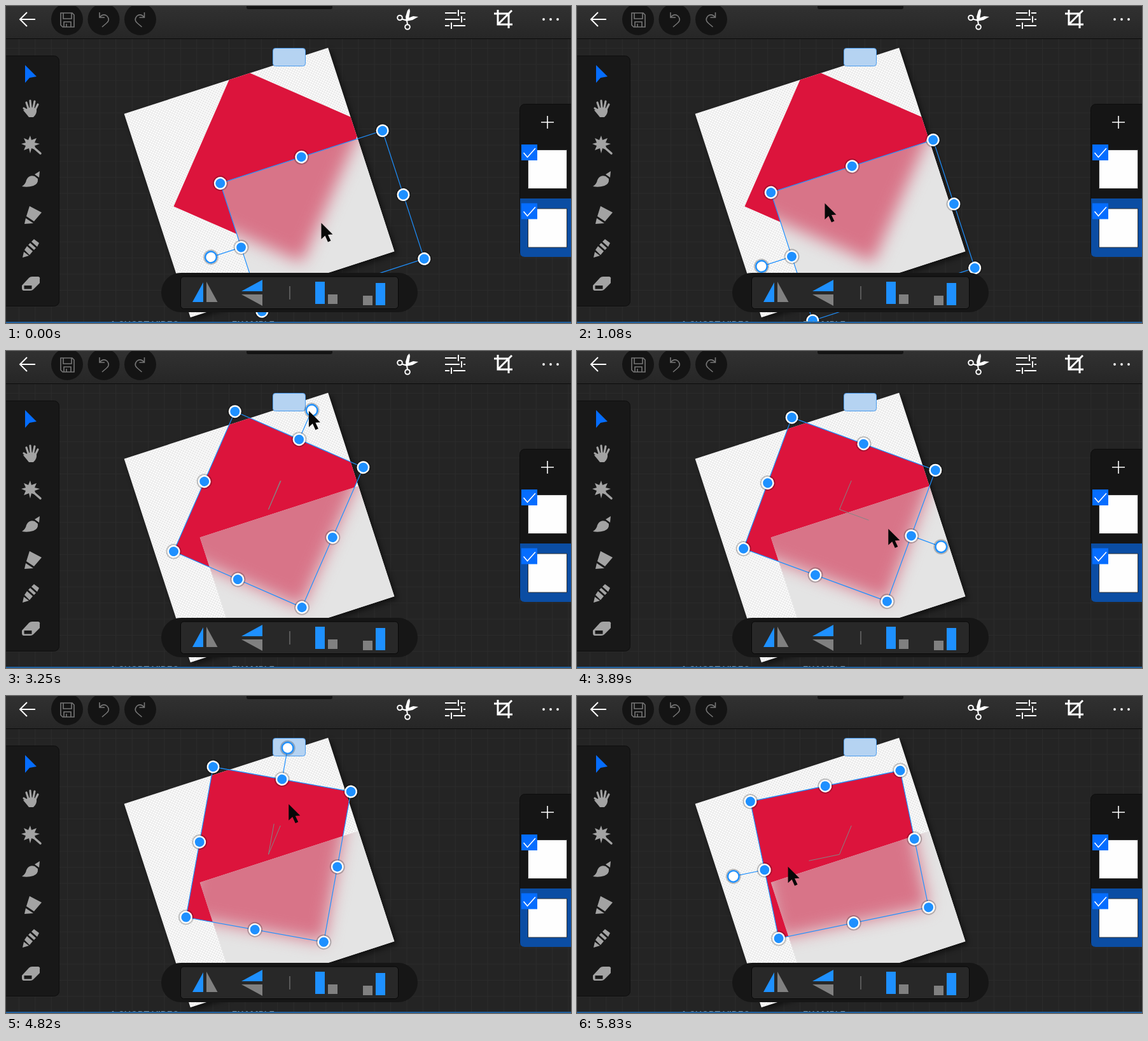
Recreate the animation shown at these times as an HTML page. Size 888 by 499 pixels, loop 5.91 s.

```html
<!DOCTYPE html>
<html lang="en">
<head>
<meta charset="utf-8">
<title>Image editor: move and rotate layers</title>
<style>
  html, body { margin: 0; width: 100%; height: 100%; overflow: hidden; background: #242424; }
  svg { display: block; }
  .line { fill: none; stroke: #fff; stroke-width: 2; }
  .thin { stroke-width: 1.6; }
  .dim { stroke: #767676; }
  .tool { fill: #a3a3a3; stroke: none; }
  .edge { fill: none; stroke: #1e90ff; stroke-width: 1.2; }
  .blue { fill: #1e90ff; }
  .grey { fill: #808080; }
</style>
</head>
<body>
<svg width="888" height="499" viewBox="0 0 888 499">
  <defs>
    <pattern id="grid" width="25.4" height="25.4" x="96" y="66" patternUnits="userSpaceOnUse">
      <path d="M0 .5H26M.5 0V26" stroke="#2b2b2b" fill="none"/>
    </pattern>
    <pattern id="checker" width="5" height="5" patternUnits="userSpaceOnUse">
      <path d="M0 0h5v5h-5z" fill="#fff"/>
      <path d="M0 0h2.500v2.500h-2.500zM2.500 2.500h2.500v2.500h-2.500z" fill="#e6e6e6"/>
    </pattern>
    <linearGradient id="bar" x2="0" y2="1">
      <stop stop-color="#313131"/><stop offset="1" stop-color="#262626"/>
    </linearGradient>
    <filter id="soft" filterUnits="userSpaceOnUse" x="0" y="0" width="888" height="600" color-interpolation-filters="sRGB">
      <feGaussianBlur stdDeviation="13"/>
    </filter>
    <filter id="shade"><feGaussianBlur stdDeviation="4"/></filter>
    <rect id="sheet" x="-168.5" y="-168.5" width="337" height="337" transform="translate(398 278) rotate(-18)"/>
    <clipPath id="page"><use href="#sheet"/></clipPath>
    <clipPath id="glass"><rect id="glassRect" x="-134" y="-106" width="268" height="212"/></clipPath>
    <rect id="card" x="-120.250" y="-110" width="240.500" height="220"/>
    <g id="handle"><circle r="12" fill="#000" opacity=".22"/><circle r="10" fill="#fff"/><circle r="7.5" class="blue"/></g>
    <g id="knob"><circle r="12" fill="#000" opacity=".22"/><circle r="10" class="blue"/><circle r="7.6" fill="#fff"/></g>
    <g id="layer">
      <path d="M820.500 226.500h61v61h-61z" fill="#fefefe" stroke="#333"/>
      <path d="M810 218h25v25h-25z" fill="#056dff"/>
      <path class="line thin" d="M813.500 231l6 7 12.500-14"/>
    </g>
  </defs>

  <rect width="888" height="499" fill="#242424"/>
  <rect width="888" height="499" fill="url(#grid)"/>

  <use href="#sheet" x="4" y="4" opacity=".55" filter="url(#shade)"/>
  <use href="#sheet" fill="url(#checker)"/>
  <g clip-path="url(#page)">
    <use class="card" href="#card" fill="#dc143c"/>
    <g clip-path="url(#glass)">
      <rect width="888" height="499" fill="#e4e4e4"/>
      <g filter="url(#soft)"><use class="card" href="#card" fill="#d87488"/></g>
    </g>
  </g>
  <rect x="419.500" y="66.500" width="51" height="28" rx="4" fill="#b5d3f2" stroke="#4a9aec"/>
  <path id="angle" fill="none" stroke="#858585"/>
  <g id="glassFrame"></g>
  <g id="cardFrame"></g>

  <!-- top bar -->
  <rect width="888" height="52" fill="url(#bar)"/>
  <path d="M0 51.500H888" stroke="#0c0c0c"/>
  <path d="M378 0h135v2q0 3-3 3h-129q-3 0-3-3z" fill="#131313"/>
  <g fill="#141414"><circle cx="96" cy="21" r="25"/><circle cx="153.500" cy="21" r="25"/><circle cx="211" cy="21" r="25"/></g>
  <path class="line" d="M46 21H22M33 10L22 21l11 11"/>
  <path class="line thin dim" d="M86 11h18l3 3v19H89l-3-3zM90 11v9h13v-9M91 33v-8h11v8M95 28v5"/>
  <g id="undo" class="line thin dim"><path d="M147 10v8h8M147 18q6-7 12-2 5 6-1 11l-7 6"/></g>
  <use href="#undo" transform="matrix(-1 0 0 1 364.500 0)"/>
  <g class="line"><circle cx="619" cy="18.500" r="3.800"/><circle cx="631" cy="33" r="3.800"/>
    <path d="M622 20.500l7 2M631 29l-1-6" /></g>
  <path fill="#fff" d="M627 21l13-5 8 1-9 5-10 2zM629 24l-1-7 3-10 3-3 1 4-2 12z"/>
  <path class="line" d="M690 11h18M714 11h8M711 6v10M690 21h23M719 21h3M716 16v10M690 31h7M703 31h19M700 26v10"/>
  <path class="line" style="stroke-width:3" d="M773 6v23h23M767 12h23v23M774 28L795 7"/>
  <g fill="#fff"><circle cx="845" cy="21" r="1.900"/><circle cx="856" cy="21" r="1.900"/><circle cx="867" cy="21" r="1.900"/></g>

  <!-- tools -->
  <rect x="-10" y="78.500" width="93.500" height="394" rx="8" fill="#181818" stroke="#0e0e0e"/>
  <path d="M30 93L48 111 37 113 30 121z" fill="#056dff"/>
  <g class="tool">
    <path d="M32 162q8-5 16 0 1 8-5 13h-7q-4-5-9-11z"/>
    <path d="M34 165l-6-4M35 161l-3-9M39 160l-1-11M43 160l2-10M46 163l4-8" stroke="#a3a3a3" stroke-width="3.200" stroke-linecap="round"/>
    <path d="M38 204l2 7 8-3-3 7 8 2-8 3 3 7-8-3-2 8-2-8-8 3 3-7-7-3 7-2-3-7 7 3z"/>
    <path d="M46 225l8 7" stroke="#a3a3a3" stroke-width="3.500" stroke-linecap="round"/>
    <path d="M25 284q6-4 7-10 4-9 13-6l5 4q1 8-7 11-9 3-18 1zM45 265l8-5-1 10z"/>
    <path d="M29 343l2-9 12 8zM32 331l5-16 19 10-12 14z"/>
    <path d="M26 396l2-9 8 6zM29 384l4-6 9 8-5 6zM35 376l3-3 9 8-3 3zM40 371l4-4 8 6-3 6z"/>
    <path d="M25 440l11-12q2-2 5-2h10q3 1 2 4v6l-10 10q-2 2-5 2H28q-3 0-3-4z"/>
  </g>
  <path d="M28.500 440h12v5.500h-12z" fill="#181818"/>

  <!-- layers -->
  <rect x="807.500" y="154.500" width="100" height="240" rx="8" fill="#151515" stroke="#0d0d0d"/>
  <path d="M808 303h80v92h-73q-7 0-7-7z" fill="#0b4da3"/>
  <path class="line thin" d="M841 183h20M851 173v20"/>
  <use href="#layer"/><use href="#layer" y="92.500"/>

  <!-- bottom toolbar -->
  <g fill="#7d93a0" font-family="Inter, sans-serif" font-size="14" font-weight="600">
    <text x="163" y="506.500">A SHORT VIDEO</text><text x="355" y="506.500">EXAMPLE</text>
  </g>
  <path d="M0 498H888" stroke="#1f5f9c" stroke-width="2"/>
  <rect x="244" y="420" width="403" height="62" rx="31" fill="#161616"/>
  <rect x="274.500" y="426" width="342" height="50.500" rx="5" fill="#282828" stroke="#070707"/>
  <path class="blue" d="M310 435v31H293zM403 431v18H370zM486 434h15v35h-15zM581 436h15v35h-15z"/>
  <path class="grey" d="M315 434v32h17.500zM403 472v-18H370zM506 454h15v15h-15zM561 456h15v15h-15z"/>
  <path d="M446 441v21" stroke="#6a6a6a" stroke-width="1.500"/>

  <path id="cursor" d="M.5 .5V26L6.500 20.500 11 30.500 15.500 28.500 11 19 18.500 18.500z" fill="#080808"/>
</svg>
<script>
const LOOP = 5910, STEP = 77.76, LAST = 75, SPIN_START = 42;
const PIVOT = [412.5, 249.4], GLASS = [497, 338.5], GRAB = [495, 341];
const $ = id => document.getElementById(id);

const drag = [[0, 0, 0], [4, -12, -22], [8, -37, 5], [9, -32, 14.5]];
const pointer = [[9, 463, 355.5], [11, 463, 355.5], [14, 389, 310], [18, 368, 211], [23, 368, 211],
  [26, 423, 312], [32, 423, 312], [35, 445, 205], [38, 476, 93.5], [42, 476, 93.5]];
const spin = [[42, -66.4], [50, 20.2], [57, 193], [65, 326], [67, 353.6], [73, 514], [75, 528.3]];
const orbit = [[42, -68, 168], [45, -45, 105], [50, 21.5, 82], [57, 218, 78], [67, 363.7, 93], [73, 520, 84], [75, 527, 83.5]];

// Monotone cubic interpolation of column c.
function sample(keys, k, c = 1) {
  const end = keys.length - 1;
  if (k <= keys[0][0]) return keys[0][c];
  if (k >= keys[end][0]) return keys[end][c];
  const i = keys.findIndex(key => key[0] > k) - 1;
  const slope = j => (keys[j + 1][c] - keys[j][c]) / (keys[j + 1][0] - keys[j][0]);
  const tangent = j => {
    if (j === 0 || j === end) return slope(Math.min(j, end - 1));
    const a = slope(j - 1), b = slope(j);
    return a * b > 0 ? 2 * a * b / (a + b) : 0;
  };
  const h = keys[i + 1][0] - keys[i][0], u = (k - keys[i][0]) / h, v = 1 - u;
  return v * v * (1 + 2 * u) * keys[i][c] + u * u * (3 - 2 * u) * keys[i + 1][c]
    + h * u * v * (v * tangent(i) - u * tangent(i + 1));
}

function buildFrame(id, w, h) {
  const x = w / 2, y = h / 2;
  let parts = `<path class="edge" d="M${-x} ${-y}H${x}V${y}H${-x}zM${x} 0h50"/>`;
  for (const i of [-1, 0, 1]) for (const j of [-1, 0, 1])
    if (i || j) parts += `<use href="#handle" x="${i * x}" y="${j * y}"/>`;
  $(id).innerHTML = parts + `<use href="#knob" x="${x + 50}"/>`;
}

const polar = (r, deg) => {
  const a = deg * Math.PI / 180;
  return [PIVOT[0] + r * Math.cos(a), PIVOT[1] + r * Math.sin(a)];
};
const place = (el, [x, y], deg = 0) => el.setAttribute('transform', `translate(${x} ${y}) rotate(${deg})`);

function draw(t) {
  const k = Math.min(LAST, Math.floor(t / STEP + 0.3));
  const shift = [sample(drag, k, 1), sample(drag, k, 2)];
  const glass = GLASS.map((p, i) => p + shift[i]);
  const turn = sample(spin, k);
  const cardSelected = (k >= 21 && k < 30) || k >= 35;

  document.querySelectorAll('.card').forEach(el => place(el, PIVOT, turn));
  place($('glassRect'), glass, 162);
  place($('glassFrame'), glass, 162);
  place($('cardFrame'), PIVOT, turn);
  $('cardFrame').style.display = cardSelected ? '' : 'none';
  $('glassFrame').style.display = cardSelected ? 'none' : '';

  $('angle').setAttribute('d', k < SPIN_START ? '' : `M${polar(49, -67.5)}L${PIVOT}L${polar(49, turn)}`);
  place($('cursor'), k < 9 ? GRAB.map((p, i) => p + shift[i])
    : k < SPIN_START ? [sample(pointer, k, 1), sample(pointer, k, 2)]
    : polar(sample(orbit, k, 2), sample(orbit, k, 1)));
}

buildFrame('glassFrame', 268, 212);
buildFrame('cardFrame', 240.5, 220);
const start = performance.now();
(function tick() {
  draw((performance.now() - start) % LOOP);
  requestAnimationFrame(tick);
})();
</script>
</body>
</html>
```
